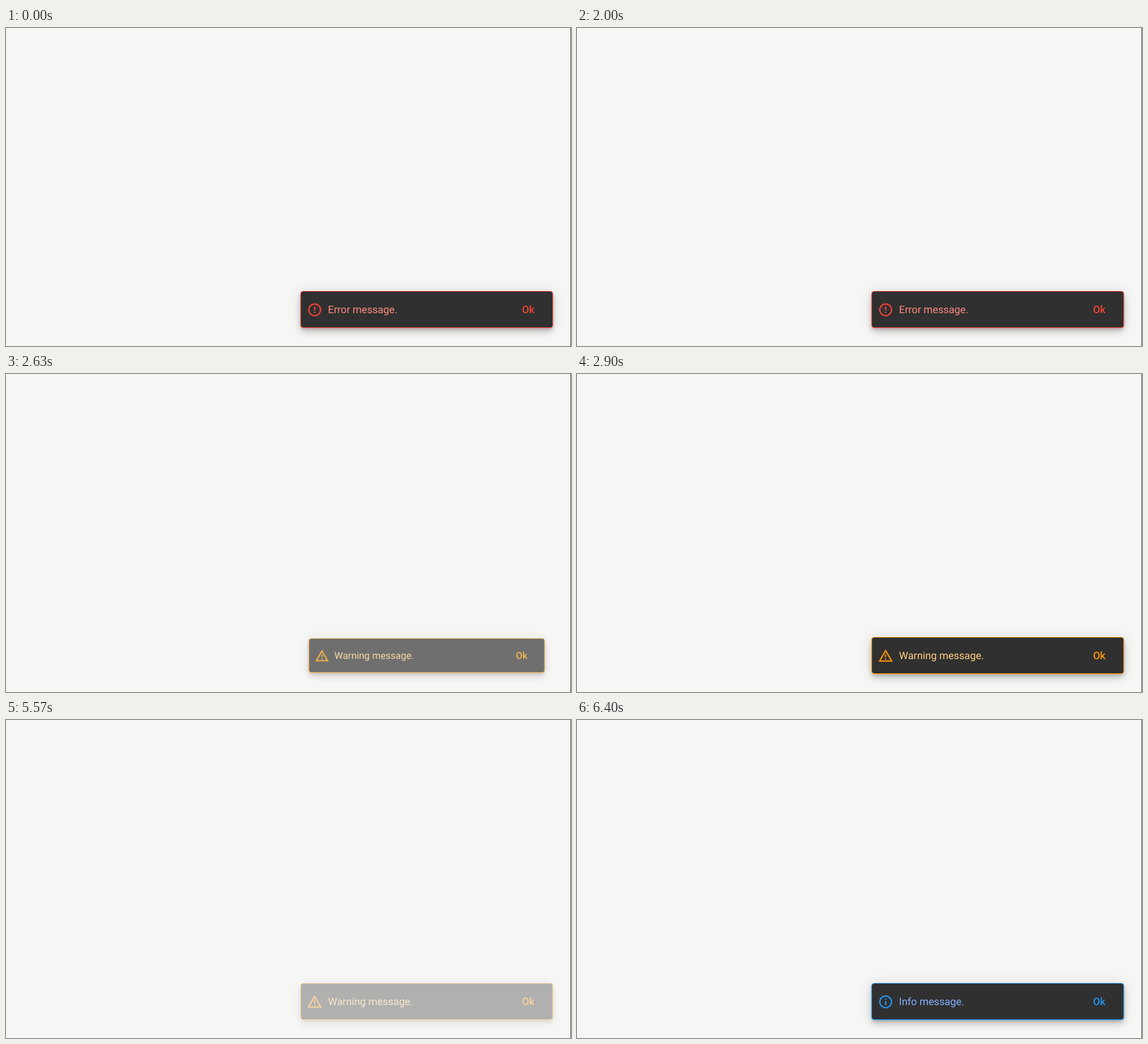
Animation of 998 by 561 pixels, one loop 8000 ms. Source, as an HTML page:

```html
<!DOCTYPE html>
<html lang="en">
<head>
<meta charset="utf-8">
<title>Snackbar messages</title>
<style>
  html, body { margin: 0; width: 100%; height: 100%; overflow: hidden; background: #f6f6f5; }
  .stage { position: relative; width: 998px; height: 561px; overflow: hidden; }
  .edge { position: absolute; right: 0; top: 0; width: 1px; height: 100%; background: #4a4a4a; }

  .snackbar {
    position: absolute; left: 520px; top: 464px; width: 446px; height: 65px;
    border-radius: 5px; opacity: 0; color: var(--accent);
    box-shadow:
      0 3.9px 6.5px -1.3px rgba(0, 0, 0, .2),
      0 7.8px 13px rgba(0, 0, 0, .14),
      0 1.3px 23.4px rgba(0, 0, 0, .12);
    animation: 8s step-end infinite;
  }
  .snackbar svg { display: block; overflow: visible; }
  .surface { fill: #303030; stroke: currentColor; stroke-width: 1.2; }
  .icon { fill: currentColor; }
  .ring { fill: none; stroke: currentColor; stroke-width: 2; }
  text { font: 400 18.2px Roboto, sans-serif; text-rendering: geometricPrecision; fill: var(--label); }
  .action { font-weight: 500; fill: currentColor; }

  .error   { --accent: #f44336; --label: #ff8a80; animation-name: error; }
  .warning { --accent: #ff9800; --label: #ffd180; animation-name: warning; }
  .info    { --accent: #2196f3; --label: #82b1ff; animation-name: info; }

  /* Entry fades and grows from 80%; exit only fades. */
  @keyframes error {
    0% { opacity: 1; }
    31.625% { opacity: .35; }
    32.875%, 100% { opacity: 0; }
  }
  @keyframes warning {
    0% { opacity: 0; transform: none; }
    32.875% { opacity: .68; transform: scale(.935); }
    33.75% { opacity: .977; transform: scale(.995); }
    34.625% { opacity: 1; transform: none; }
    69.625% { opacity: .35; transform: none; }
    70.875%, 100% { opacity: 0; transform: none; }
  }
  @keyframes info {
    0% { opacity: 0; transform: none; }
    70.875% { opacity: .68; transform: scale(.935); }
    71.75% { opacity: .977; transform: scale(.995); }
    72.875%, 100% { opacity: 1; transform: none; }
  }
</style>
</head>
<body>
<div class="stage">
  <div class="edge"></div>

  <div class="snackbar error">
    <svg width="446" height="65">
      <rect class="surface" x=".5" y=".5" width="445.3" height="64.1" rx="4.6"/>
      <g class="icon" transform="translate(25.2 33.2) scale(1.15) translate(-12 -12)">
        <circle class="ring" cx="12" cy="12" r="9"/>
        <path d="M11 7h2v6h-2zM11 15h2v2h-2z"/>
      </g>
      <text x="48.8" y="39.3">Error message.</text>
      <text class="action" x="391.5" y="39.3">Ok</text>
    </svg>
  </div>

  <div class="snackbar warning">
    <svg width="446" height="65">
      <rect class="surface" x=".5" y=".5" width="445.3" height="64.1" rx="4.6"/>
      <g class="icon" transform="translate(25.2 33.2) scale(1.15) translate(-12 -12)">
        <path fill-rule="evenodd" d="M12 2L1 21h22zM12 5.99L19.53 19H4.47z"/>
        <path d="M11 10h2v4h-2zM11 16h2v2h-2z"/>
      </g>
      <text x="48.8" y="39.3">Warning message.</text>
      <text class="action" x="391.5" y="39.3">Ok</text>
    </svg>
  </div>

  <div class="snackbar info">
    <svg width="446" height="65">
      <rect class="surface" x=".5" y=".5" width="445.3" height="64.1" rx="4.6"/>
      <g class="icon" transform="translate(25.2 33.2) scale(1.15) translate(-12 -12)">
        <circle class="ring" cx="12" cy="12" r="9"/>
        <path d="M11 7h2v2h-2zM11 11h2v6h-2z"/>
      </g>
      <text x="48.8" y="39.3">Info message.</text>
      <text class="action" x="391.5" y="39.3">Ok</text>
    </svg>
  </div>
</div>
</body>
</html>
```
